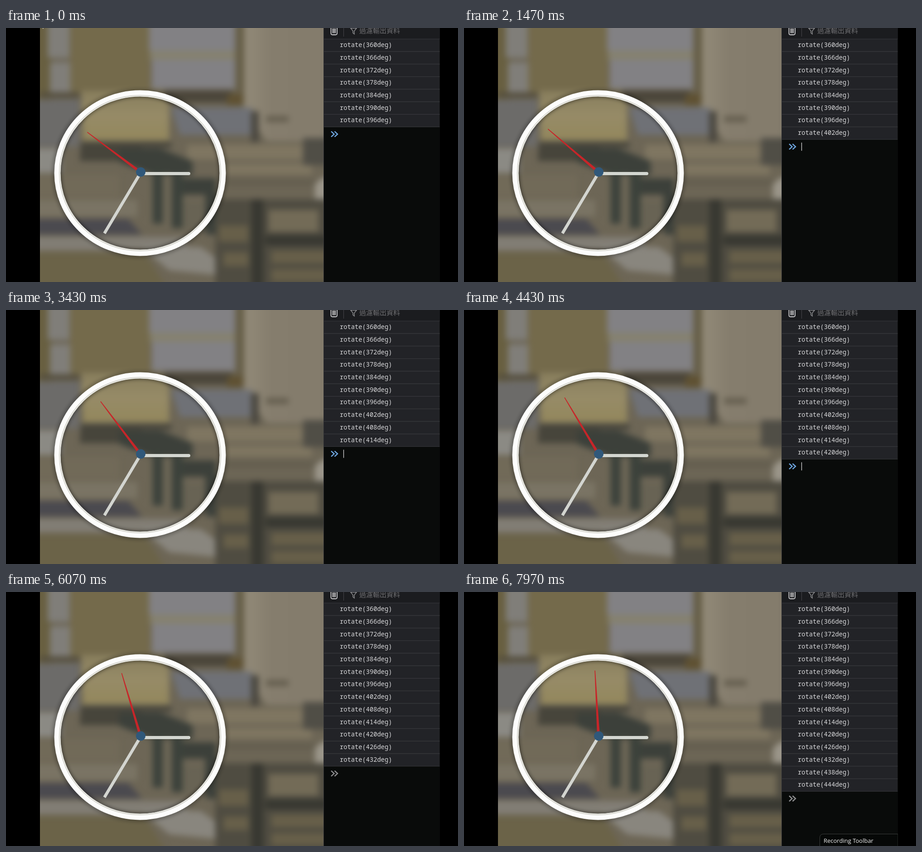
Animation, 998 px wide and 561 px high, one loop 8 s. Source, as an HTML page:

```html
<!DOCTYPE html>
<html lang="zh-Hant">
<head>
<meta charset="utf-8">
<title>Clock and console</title>
<style>
  html, body { margin: 0; width: 100%; height: 100%; overflow: hidden; background: #000; }
  svg { display: block; width: 998px; height: 561px; }
  .log { font: 13.75px "Noto Sans Mono", "DejaVu Sans Mono", monospace; fill: #d8d8da; white-space: pre; }
  .filter { font: 15px "Noto Sans CJK TC", "Noto Sans CJK", sans-serif; fill: #707073; }
  .tip { font: 13px "Open Sans", "Noto Sans", sans-serif; fill: #f2f2f2; }
</style>
</head>
<body>
<svg viewBox="0 0 998 561">
  <defs>
    <filter id="soft" x="-5%" y="-5%" width="110%" height="110%" color-interpolation-filters="sRGB"><feGaussianBlur stdDeviation="7"/></filter>
    <filter id="shade" x="-10%" y="-10%" width="120%" height="120%"><feGaussianBlur stdDeviation="4"/></filter>
    <clipPath id="photo"><path d="M75 0h626v561h-626z"/></clipPath>
    <clipPath id="face"><ellipse cx="296" cy="320.5" rx="177" ry="170.5"/></clipPath>
    <linearGradient id="wall" x2="1"><stop stop-color="#928a78"/><stop offset=".3" stop-color="#857d6d"/><stop offset="1" stop-color="#837b6b"/></linearGradient>
    <linearGradient id="paper" x2="0" y2="1"><stop stop-color="#877d5c"/><stop offset=".5" stop-color="#968b67"/><stop offset="1" stop-color="#93875c"/></linearGradient>
  </defs>

  <!-- blurred room -->
  <g clip-path="url(#photo)">
    <path fill="#6d6656" d="M75 0h626v561h-626z"/>
    <g filter="url(#soft)">
      <!-- shelves and wall -->
      <path fill="#685f40" d="M55 -20h45v180h-45z"/>
      <path fill="#807e79" d="M92 -20h48v86h-48zM97 76h48v67h-48z"/>
      <path fill="#746a4b" d="M142 -20h176v165h-176z"/>
      <path fill="#828184" d="M316 -20h190v70h-190zM322 70h184v64h-184z"/>
      <path fill="#85816f" d="M318 50h188v20h-188z"/>
      <path fill="#665e48" d="M506 -20h20v185h-20z"/>
      <path fill="url(#wall)" d="M526 -20h200v270h-150l-50-70z"/>
      <path fill="#544e3e" d="M75 142h88v12h-88z"/>
      <path fill="#4b463a" d="M350 138h150v26h-150z"/>
      <path fill="#5f5132" d="M488 146h34v24h-34z"/>
      <path fill="#6c6b69" d="M55 158h107v104h-107z"/>
      <path fill="#6f7176" d="M364 176h180v60h-160z"/>
      <path fill="#4b4840" d="M541 184h17v68h-17z"/>
      <path fill="#665f50" d="M574 194h50v14h-50z"/>
      <path fill="url(#paper)" d="M166 138h178l16 30v80h-190z"/>
      <path fill="#47453b" d="M165 252h200v12h-65v30h-137z"/>
      <!-- middle bench -->
      <path fill="#8b8a84" d="M55 266h68v54h-68z"/>
      <path fill="#716a58" d="M55 324h195v50h-195z"/>
      <path fill="#7f7661" d="M400 258h255v32h-255zM475 300h200v24h-200z"/>
      <path fill="#645e4f" d="M482 334h200v14h-200z"/>
      <path fill="#504e46" d="M656 243h60v60h-60z"/>
      <path fill="#3c403a" d="M250 266h90l72 28v30h-90l-72-28zM380 332h84v36h-84zM440 366h28v90h-28z"/>
      <path fill="#3c423b" d="M324 310h22v122h-22zM366 320h24v122h-24z"/>
      <path fill="#686354" d="M394 384h44v60h-44z"/>
      <path fill="#9b968a" d="M682 345l18-15h20v115h-38z"/>
      <!-- lower table -->
      <path fill="#7a7464" d="M55 380h235v36h-235z"/>
      <path fill="#4b4a4f" d="M55 422h215l30 34h-245z"/>
      <path fill="#827e75" d="M55 461h345v30h-345z"/>
      <path fill="#6b6348" d="M55 496h250l55 85h-305z"/>
      <path fill="#89867e" d="M300 484h130l75 55v10l-145-14z"/>
      <path fill="#4f4c41" d="M462 378h258v203h-258z"/>
      <path fill="#675f49" d="M470 436h65v36h-65zM480 496h55v30h-55zM586 492h130v28h-130zM586 532h130v28h-130z"/>
      <path fill="#736b57" d="M580 402h110v48h-110z"/>
      <path fill="#383831" d="M542 378h26v200h-26zM572 458h140v22h-140z"/>
    </g>
  </g>

  <!-- clock rim -->
  <g fill="none">
    <g clip-path="url(#face)"><ellipse cx="296" cy="320.5" rx="179" ry="172.5" stroke="#000" stroke-opacity=".55" stroke-width="9" filter="url(#shade)"/></g>
    <ellipse cx="296" cy="320.5" rx="188" ry="181.5" stroke="#000" stroke-opacity=".3" stroke-width="10" filter="url(#shade)"/>
    <ellipse cx="296" cy="320.5" rx="182.700" ry="176.200" stroke="#fdfdfc" stroke-width="13.400"/>
    <ellipse cx="296" cy="320.5" rx="177" ry="170.5" stroke="#e9e9e3" stroke-width="3"/>
    <ellipse cx="296" cy="320.5" rx="178.6" ry="172.1" stroke="#c5c3bb" stroke-width=".9"/>
  </g>

  <!-- hands -->
  <path fill="#d4d7d1" d="M297 318h106.500a3.500 3.500 0 0 1 0 7h-106.500z"/>
  <path stroke="#d3d5d0" stroke-width="6.500" d="M297 320L217.300 453.500"/>
  <path id="second" fill="#c72529"/>
  <circle cx="297.500" cy="318" r="10.500" fill="#30587a"/>

  <!-- console -->
  <path fill="#090b0a" d="M701 0h257v561h-257z"/>
  <path fill="#1b1c1f" d="M701 0h257v24h-257z"/>
  <path fill="none" stroke="#cfcfd1" stroke-width="1.800" d="M717.500 0V11.500q0 3.500 3.500 3.500h6.500q3.500 0 3.500-3.500V0M721.500 1v10.500M724.300 1v10.500M727.100 1v10.500"/>
  <path stroke="#46464a" d="M745.500 0v19"/>
  <path fill="none" stroke="#8d8d90" stroke-width="1.500" d="M761 0.500h13l-5 6v7l-3-2.500v-4.500z"/>
  <text class="filter" x="780" y="11">過濾輸出資料</text>
  <g id="rows"></g>
  <path stroke="#303135" d="M701.500 0v561"/>
  <g id="prompt">
    <path id="chevrons" fill="none" stroke-width="2.400" d="M718 -6l6.500 6l-6.500 6M725.500 -6l6.500 6l-6.500 6"/>
    <path id="caret" stroke="#dcdcde" stroke-width="1.300" d="M745.500 -9v18"/>
  </g>

  <g id="toolbar">
    <path fill="#060807" stroke="#3b3e3d" d="M785.500 565V543q0-8.500 8.500-8.500H958V565"/>
    <text class="tip" x="794" y="554">Recording Toolbar</text>
  </g>
  <path d="M958 0h40v561h-40z"/>
  <path id="pointer" fill="#ddd" d="M80.500 0h2.500l-1 2z"/>
</svg>
<script>
  const LOOP = 8000, TICK = 1000, TICK_LEAD = 300, SWING = 600;
  const FIRST_ROWS = 7, MAX_ROWS = 15, ROW_TOP = 24.3, ROW_HEIGHT = 27.73;
  const BLUR_AT = 5400, TOOLBAR_AT = 7000;
  const el = id => document.getElementById(id);
  const show = (node, on) => node.setAttribute('visibility', on ? 'visible' : 'hidden');

  el('rows').innerHTML = Array.from({ length: MAX_ROWS }, (_, i) => {
    const y = ROW_TOP + i * ROW_HEIGHT;
    return `<g><rect x="701" y="${y}" width="256.5" height="${ROW_HEIGHT}" fill="#222327"/>
      <path stroke="#3a3b3f" d="M701 ${y}h256.500M701 ${y + ROW_HEIGHT}h256.500"/>
      <text class="log" x="737" y="${y + 17.8}">rotate(${360 + 6 * i}deg)</text></g>`;
  }).join('');
  const rows = [...el('rows').children];

  const bezier = (a, b, s) => 3 * (1 - s) ** 2 * s * a + 3 * (1 - s) * s * s * b + s ** 3;

  // cubic-bezier(.1, 2.7, .58, 1): swings past the mark and settles back
  function overshoot(x) {
    if (x >= 1) return 1;
    let low = 0, high = 1;
    for (let i = 0; i < 24; i++) {
      const mid = (low + high) / 2;
      if (bezier(0.1, 0.58, mid) < x) low = mid; else high = mid;
    }
    return bezier(2.7, 1, low);
  }

  function drawSecondHand(degrees) {
    const a = degrees * Math.PI / 180, sin = Math.sin(a), cos = Math.cos(a);
    const tipX = 297.6 + 151 * sin, tipY = 324.2 - 151 * cos;
    const at = (x, y, side) => `${x + side * cos} ${y + side * sin}`;
    el('second').setAttribute('d',
      `M${at(tipX, tipY, -0.8)}L${at(tipX, tipY, 0.8)}L${at(297, 318.5, 3)}L${at(297, 318.5, -3)}Z`);
  }

  function draw(t) {
    const ticks = Math.floor((t + TICK_LEAD) / TICK);
    const phase = (t + TICK_LEAD) % TICK;
    const count = FIRST_ROWS + ticks;
    const focused = t < BLUR_AT;
    drawSecondHand(-60 + 6 * (ticks + overshoot(phase / SWING)));
    rows.forEach((row, i) => show(row, i < count));
    el('prompt').setAttribute('transform', `translate(0 ${ROW_TOP + count * ROW_HEIGHT + 16})`);
    el('chevrons').setAttribute('stroke', focused ? '#70a9e3' : '#8f8f91');
    show(el('caret'), focused && (t + 960) % 1060 < 530);
    show(el('toolbar'), t >= TOOLBAR_AT);
    show(el('pointer'), t < 300);
  }

  const start = performance.now();
  function frame() {
    draw((performance.now() - start) % LOOP);
    requestAnimationFrame(frame);
  }
  frame();
</script>
</body>
</html>
```
